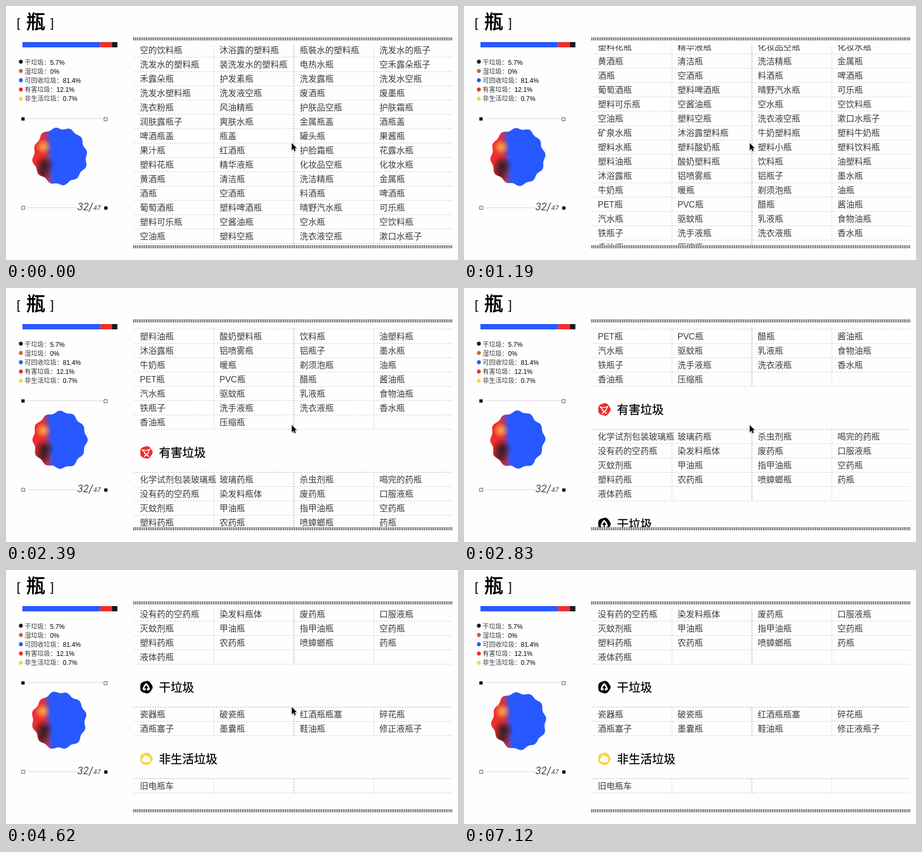
Recreate the animation shown at these times as an HTML page with a canvas. Size 851 by 479 pixels, loop 7220 ms.

```html
<!DOCTYPE html>
<html lang="zh">
<head>
<meta charset="utf-8">
<title>瓶</title>
<style>
html, body { margin: 0; width: 100%; height: 100%; overflow: hidden; background: #fefefe; }
canvas { display: block; width: 851px; height: 479px; }
</style>
</head>
<body>
<canvas id="stage"></canvas>
<script>
const W = 851, H = 479, LOOP = 7220;
const canvas = document.getElementById('stage');
const ctx = canvas.getContext('2d');
const dpr = window.devicePixelRatio || 1;
canvas.width = W * dpr;
canvas.height = H * dpr;

const SANS = '"Liberation Sans", "Noto Sans CJK SC", "Noto Sans CJK", sans-serif';
const BLUE = '#2858ff', RED = '#f02d2d', BLACK = '#1a1a1a', YELLOW = '#f8d44c', BROWN = '#c8663a';
const ROW = 27, COLS = [252, 402, 553, 703];

const sections = [
  { top: 69.5, rows: `空的饮料瓶 沐浴露的塑料瓶 瓶裝水的塑料瓶 洗发水的瓶子
洗发水的塑料瓶 装洗发水的塑料瓶 电热水瓶 空禾露朵瓶子
禾露朵瓶 护发素瓶 洗发露瓶 洗发水空瓶
洗发水塑料瓶 洗发液空瓶 废酒瓶 废墨瓶
洗衣粉瓶 风油精瓶 护肤品空瓶 护肤霜瓶
润肤露瓶子 爽肤水瓶 金属瓶盖 酒瓶盖
啤酒瓶盖 瓶盖 罐头瓶 果酱瓶
果汁瓶 红酒瓶 护脸霜瓶 花露水瓶
塑料花瓶 精华液瓶 化妆品空瓶 化妆水瓶
黄酒瓶 清洁瓶 洗洁精瓶 金属瓶
酒瓶 空酒瓶 料酒瓶 啤酒瓶
葡萄酒瓶 塑料啤酒瓶 晴野汽水瓶 可乐瓶
塑料可乐瓶 空酱油瓶 空水瓶 空饮料瓶
空油瓶 塑料空瓶 洗衣液空瓶 漱口水瓶子
矿泉水瓶 沐浴露塑料瓶 牛奶塑料瓶 塑料牛奶瓶
塑料水瓶 塑料酸奶瓶 塑料小瓶 塑料饮料瓶
塑料油瓶 酸奶塑料瓶 饮料瓶 油塑料瓶
沐浴露瓶 铝喷雾瓶 铝瓶子 墨水瓶
牛奶瓶 暖瓶 剃须泡瓶 油瓶
PET瓶 PVC瓶 醋瓶 酱油瓶
汽水瓶 驱蚊瓶 乳液瓶 食物油瓶
铁瓶子 洗手液瓶 洗衣液瓶 香水瓶
香油瓶 压缩瓶` },
  { top: 771.5, name: '有害垃圾', icon: drawHazard, rows: `化学试剂包装玻璃瓶 玻璃药瓶 杀虫剂瓶 喝完的药瓶
没有药的空药瓶 染发料瓶体 废药瓶 口服液瓶
灭蚊剂瓶 甲油瓶 指甲油瓶 空药瓶
塑料药瓶 农药瓶 喷蟑螂瓶 药瓶
液体药瓶` },
  { top: 987.5, name: '干垃圾', icon: drawDry, rows: `瓷器瓶 破瓷瓶 红酒瓶瓶塞 碎花瓶
酒瓶塞子 墨囊瓶 鞋油瓶 修正液瓶子` },
  { top: 1122.5, name: '非生活垃圾', icon: drawOther, rows: '旧电瓶车' }
];
for (const s of sections) s.rows = s.rows.split('\n').map(r => r.split(' '));

// Each track lists [step, value...]; values between are linear.
const scrollTrack = [[0, 0], [5, 138], [12, 334], [16, 424], [24, 641], [27, 708], [29, 729]];
const cursorTrack = [[36, 538, 258], [39, 588, 371], [41, 724, 454]];
const blobTrack = [[0, 101.5, 283, -9], [5, 101, 283, -7], [12, 101, 285.5, -2], [16, 101, 286.5, 0],
  [24, 100, 286, -4], [31, 100, 284, -13], [36, 101, 284, -11], [40, 103, 285, -8], [48, 103.5, 284.5, -6]];

function sample(track, k) {
  if (k <= track[0][0]) return track[0].slice(1);
  for (let i = 1; i < track.length; i++) {
    const a = track[i - 1], b = track[i];
    if (k <= b[0]) {
      const u = (k - a[0]) / (b[0] - a[0]);
      return a.slice(1).map((v, j) => v + (b[j + 1] - v) * u);
    }
  }
  return track[track.length - 1].slice(1);
}

// The picture advances every 150 ms, with a few steps of 140 ms.
const shortSteps = [4, 17, 28, 32, 36, 40, 44, 48];
const stepStart = k => 150 * k - 10 * shortSteps.filter(s => s <= k).length;
function stepAt(t) {
  let k = 0;
  while (k < 48 && stepStart(k + 1) <= t) k++;
  return k;
}

function text(str, x, y, size, color = '#3c3c3c', weight = 300, bold = 0) {
  ctx.font = `${weight} ${size}px ${SANS}`;
  ctx.fillStyle = ctx.strokeStyle = color;
  ctx.fillText(str, x, y);
  if (bold) {
    ctx.lineWidth = bold;
    ctx.lineJoin = 'round';
    ctx.strokeText(str, x, y);
  }
}

function line(x1, y1, x2, y2, color, width = 1, dash = []) {
  ctx.beginPath();
  ctx.setLineDash(dash);
  ctx.strokeStyle = color;
  ctx.lineWidth = width;
  ctx.moveTo(x1, y1);
  ctx.lineTo(x2, y2);
  ctx.stroke();
  ctx.setLineDash([]);
}

function disc(x, y, r, color) {
  ctx.fillStyle = color;
  ctx.beginPath();
  ctx.arc(x, y, r, 0, 7);
  ctx.fill();
}

function box(x, y, solid) {
  ctx.fillStyle = '#000';
  ctx.strokeStyle = '#555';
  ctx.lineWidth = 1;
  if (solid) ctx.fillRect(x - 3, y - 3, 6, 6);
  else ctx.strokeRect(x - 3, y - 3, 6, 6);
}

function wavy(rx, ry, radius) {
  ctx.beginPath();
  for (let i = 0; i < 240; i++) {
    const a = i / 240 * Math.PI * 2, r = radius(a);
    ctx.lineTo(Math.cos(a) * (rx + r), Math.sin(a) * (ry + r));
  }
  ctx.closePath();
}

function badge(color) {
  wavy(11.6, 11.6, a => 0.45 * Math.cos(5 * a));
  ctx.fillStyle = color;
  ctx.fill();
}

function poly(points, color) {
  ctx.beginPath();
  points.forEach(p => ctx.lineTo(p[0], p[1]));
  ctx.closePath();
  ctx.fillStyle = color;
  ctx.fill();
}

function drawHazard() {
  badge(RED);
  ctx.strokeStyle = '#fff';
  ctx.lineWidth = 1.6;
  ctx.beginPath();
  ctx.moveTo(-2, 1);
  ctx.lineTo(-8, -5);
  ctx.quadraticCurveTo(0, -2, 7, -6);
  ctx.lineTo(3, 1);
  ctx.stroke();
  line(-4, 1, 5, 8, '#fff', 1.8);
  line(4, 1, -4, 8, '#fff', 1.8);
}

function drawDry() {
  badge('#000');
  poly([[0, -8], [4, -4], [7, 3], [5, 6], [-5, 6], [-7, 3], [-4, -4]], '#fff');
  poly([[0, -4], [4, 2], [1, 2], [1, 7], [-1, 7], [-1, 2], [-4, 2]], '#000');
}

function drawOther() {
  badge(YELLOW);
  for (const [x, y, r] of [[-4, 2, 4], [-1, -2, 4.2], [4, 0, 3.6], [4, 3, 3.4], [0, 3, 3.4]]) disc(x, y, r, '#fff');
  line(-2, 3, 1, 1, YELLOW);
  line(3, -1, 4, 2, YELLOW);
}

function drawSection(s, shift) {
  const y = s.top - shift, end = y + s.rows.length * ROW;
  if (end < 60 || y > 520) return;
  if (s.name) {
    ctx.save();
    ctx.translate(264, y - 37.5);
    s.icon();
    ctx.restore();
    text(s.name, 288, y - 29.5, 22, '#000', 400, 0.3);
  }
  line(240, y, 840, y, '#b4b4b4', 1, [3, 2]);
  for (const x of [391.5, 692.5]) line(x, y, x, end, '#cfcfcf', 1, [3, 2]);
  line(542, y, 542, end, '#c8c8c8', 2, [3, 2]);
  s.rows.forEach((cells, i) => {
    const top = y + i * ROW;
    cells.forEach((c, j) => text(c, COLS[j], top + 19.5, 16));
    line(242, top + ROW, 840, top + ROW, '#cfcfcf', 1, [3, 2]);
  });
}

function drawTables(k) {
  const shift = Math.round(sample(scrollTrack, k)[0]);
  ctx.save();
  ctx.beginPath();
  ctx.rect(240, 74, 600, 377);
  ctx.clip();
  sections.forEach(s => drawSection(s, shift));
  ctx.restore();
  for (const y of [62, 454]) line(240, y, 840, y, '#222', 6, [1.3, 2.1]);
}

function drawSummary() {
  text('[', 20, 40, 24, '#000', 400);
  text('瓶', 38, 43, 36, '#000', 400, 0.9);
  text(']', 83.5, 40, 24, '#000', 400);

  const bar = [[31, 146.5, BLUE], [177.5, 21.8, RED], [199.3, 10.4, BLACK], [209.7, 1.3, YELLOW]];
  for (const [x, w, color] of bar) {
    ctx.fillStyle = color;
    ctx.fillRect(x, 68, w, 10);
  }

  line(28, 105, 28, 175, '#ccc', 1, [1, 2]);
  const legend = [['干垃圾', '5.7%', BLACK], ['湿垃圾', '0%', BROWN], ['可回收垃圾', '81.4%', BLUE],
    ['有害垃圾', '12.1%', RED], ['非生活垃圾', '0.7%', YELLOW]];
  legend.forEach(([name, share, color], i) => {
    disc(28, 105 + i * 17.5, 3.7, color);
    const y = 111 + i * 17;
    text(name + '：', 35, y, 12);
    text(share, 35 + 12 * (name.length + 1), y, 12, '#000', 400);
  });

  line(42, 212.5, 183, 212.5, '#aaa', 1, [1, 1]);
  box(32, 213, true);
  box(187.5, 213.5, false);
  line(42, 380.5, 134, 380.5, '#aaa', 1, [1, 1]);
  box(32.5, 380.5, false);
  box(188, 381, true);

  ctx.fillStyle = '#111';
  for (const [str, x, y, size] of [['32', 134, 385, 18], ['/', 156, 386, 20], ['47', 164, 385, 12]]) {
    ctx.font = `italic 300 ${size}px Inter, sans-serif`;
    ctx.fillText(str, x, y);
  }
}

function glow(x, y, r, rgb, strength) {
  const g = ctx.createRadialGradient(x, y, 0, x, y, r);
  g.addColorStop(0, `rgba(${rgb},${strength})`);
  g.addColorStop(0.4, `rgba(${rgb},${strength * 0.65})`);
  g.addColorStop(1, `rgba(${rgb},0)`);
  ctx.fillStyle = g;
  ctx.fillRect(x - r, y - r, 2 * r, 2 * r);
}

function drawBlob(k) {
  const [x, y, turn] = sample(blobTrack, k);
  const spin = turn * Math.PI / 180;
  ctx.save();
  ctx.translate(x, y);
  wavy(50.2, 53, a => 1.8 * Math.cos(12 * (a - spin)) + 0.9 * Math.sin(5 * a + k * 0.12));
  ctx.clip();
  const g = ctx.createLinearGradient(-30, 0, -14, -1);
  g.addColorStop(0, RED);
  g.addColorStop(1, BLUE);
  ctx.fillStyle = g;
  ctx.fillRect(-60, -62, 120, 124);
  glow(-29, 17, 19, '26,26,34', 0.9);
  glow(-32, 33, 17, '26,26,40', 0.75);
  glow(-31, -18, 15, '248,190,76', 0.85);
  ctx.restore();
}

function drawCursor(k) {
  if (k > 41) return;
  const [x, y] = sample(cursorTrack, k);
  ctx.save();
  ctx.translate(x, y + 0.5);
  ctx.scale(0.93, 0.93);
  ctx.beginPath();
  for (const p of [[0, 0], [0, 14.5], [3.3, 11.4], [5.5, 16.5], [8, 15.4], [5.8, 10.5], [10, 10.3]]) ctx.lineTo(...p);
  ctx.closePath();
  ctx.shadowColor = 'rgba(0,0,0,.35)';
  ctx.shadowBlur = 2 * dpr;
  ctx.shadowOffsetY = dpr;
  ctx.lineWidth = 1.6;
  ctx.strokeStyle = '#fff';
  ctx.stroke();
  ctx.shadowColor = 'transparent';
  ctx.fillStyle = '#000';
  ctx.fill();
  ctx.restore();
}

function draw(t) {
  const k = stepAt(t % LOOP);
  ctx.setTransform(dpr, 0, 0, dpr, 0, 0);
  ctx.fillStyle = '#fefefe';
  ctx.fillRect(0, 0, W, H);
  drawSummary();
  drawTables(k);
  drawBlob(k);
  drawCursor(k);
}

const start = performance.now();
function tick() {
  draw(performance.now() - start);
  requestAnimationFrame(tick);
}
tick();
</script>
</body>
</html>
```
